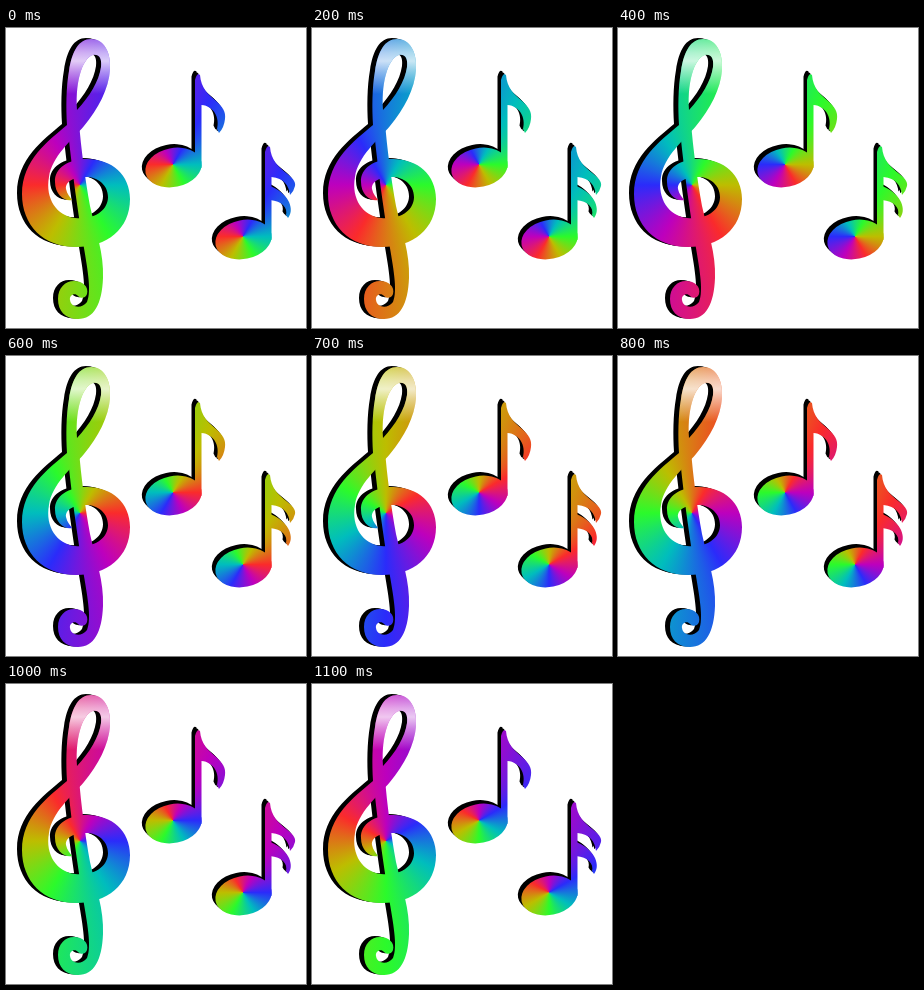
Recreate the animation shown at these times as an HTML page with a canvas. Size 300x300 px, loop 1.2 s.

```html
<!DOCTYPE html>
<html lang="en">
<head>
<meta charset="utf-8">
<title>Rainbow notes</title>
<style>
html, body { margin: 0; width: 100%; height: 100%; overflow: hidden; background: #fff; }
canvas { display: block; width: 300px; height: 300px; }
</style>
</head>
<body>
<canvas id="stage" width="300" height="300"></canvas>
<script>
const ctx = document.getElementById('stage').getContext('2d');
const STEP_MS = 100, STEPS = 12;

// Loop, outer sweep, belly ring and inner spiral
const sweep = new Path2D(`M61 97 C60 80 60 60 63 43 C66 23 73 11 85 11
  C98 11 105 24 104 41 C103 61 92 81 78 98 C66 112 46 128 43 149
  C39 171 51 188 69 190 C89 192 102 182 102 169 C102 157 92 149 80 149
  C69 149 59 153 60 161 C61 166 64 169 66 172 C59 174 49 167 49 154
  C48 140 63 131 81 131 C106 131 124 147 124 171 C124 201 101 219 70 219
  C37 219 16 197 16 166 C16 132 42 113 61 97 Z
  M71 82 C84 68 93 53 95 39 C96 30 93 26 87 27 C78 29 69 50 71 82 Z`);

// Stem with the curl at its foot
const stem = new Path2D(`M61 92 L73 94 C75 120 79 150 84 178 C90 205 98 225 97 250
  C96 276 88 291 72 291 C59 291 52 283 52 271 C52 260 59 253 68 253
  C77 253 83 259 81 266 C80 270 75 271 72 268 C69 264 63 267 64 272
  C65 280 76 281 81 274 C86 262 81 239 77 214 C73 190 66 145 61 92 Z`);

const head = new Path2D();
head.ellipse(167.5, 139.5, 28.5, 19.5, -0.2, 0, Math.PI * 2);
const flag = new Path2D(`M189 140 L189 52 Q191 44 194 47 C195 60 202 66 209 72
  C217 79 220 84 219 91 Q218 100 213 105 L211 101 C214 90 208 78 195.5 77 L195.5 140 Z`);
const highFlag = new Path2D(`M189 140 L189 52 Q191 44 194 47 C195 60 202 66 209 72
  C217 78 220 82 219 86 Q218 91 214 95 C213 86 208 78 195.5 77 L195.5 140 Z`);
const lowFlag = new Path2D(`M194 86 C202 89 210 95 213 102 C216 109 215 114 212 118
  L210 115 C212 108 206 101 194 100 Z`);

const shapes = [
  { parts: [sweep, stem], at: [0, 0], hub: [74, 157], shade: [-5, -1], glow: true },
  { parts: [head, flag], at: [0, 0], hub: [167, 136.5], shade: [-3.5, -3.5] },
  { parts: [head, highFlag, lowFlag], at: [70, 72], hub: [167, 136.5], shade: [-3.5, -3.5] }
];

// Red, green and blue are slightly lifted; the hues between them are darker
function rainbow(hue) {
  const h = ((hue % 360) + 360) % 360;
  const primary = Math.abs((h % 120) - 60) / 60;
  const value = 0.74 + 0.24 * primary;
  const floor = 0.17 * primary;
  const part = n => {
    const k = (n + h / 60) % 6;
    const full = 1 - Math.max(0, Math.min(k, 4 - k, 1));
    return Math.round(255 * (floor + (value - floor) * full));
  };
  return `rgb(${part(5)},${part(3)},${part(1)})`;
}

function wheel([x, y], step) {
  const g = ctx.createConicGradient(0, x, y);
  for (let i = 0; i <= 36; i++) g.addColorStop(i / 36, rainbow(180 - i * 10 - step * 30));
  return g;
}

const glow = ctx.createLinearGradient(0, 11, 0, 66);
[[0, 0.35], [0.25, 0.65], [0.4, 0.78], [0.6, 0.5], [1, 0]]
  .forEach(([at, a]) => glow.addColorStop(at, `rgba(255,255,255,${a})`));

function paint(parts, style) {
  ctx.fillStyle = style;
  parts.forEach(p => ctx.fill(p, 'evenodd'));
}

// Black side of the letters, swept from the full offset towards the face
function paintShade(parts, [dx, dy]) {
  for (const k of [1, 0.5]) {
    ctx.save();
    ctx.translate(dx * k, dy * k);
    paint(parts, '#000');
    ctx.restore();
  }
}

function draw(step) {
  ctx.fillStyle = '#fff';
  ctx.fillRect(0, 0, 300, 300);
  for (const s of shapes) {
    ctx.save();
    ctx.translate(...s.at);
    paintShade(s.parts, s.shade);
    paint(s.parts, wheel(s.hub, step));
    if (s.glow) paint([sweep], glow);
    ctx.restore();
  }
}

function tick() {
  draw(Math.floor(performance.now() / STEP_MS) % STEPS);
  requestAnimationFrame(tick);
}
tick();
</script>
</body>
</html>
```
